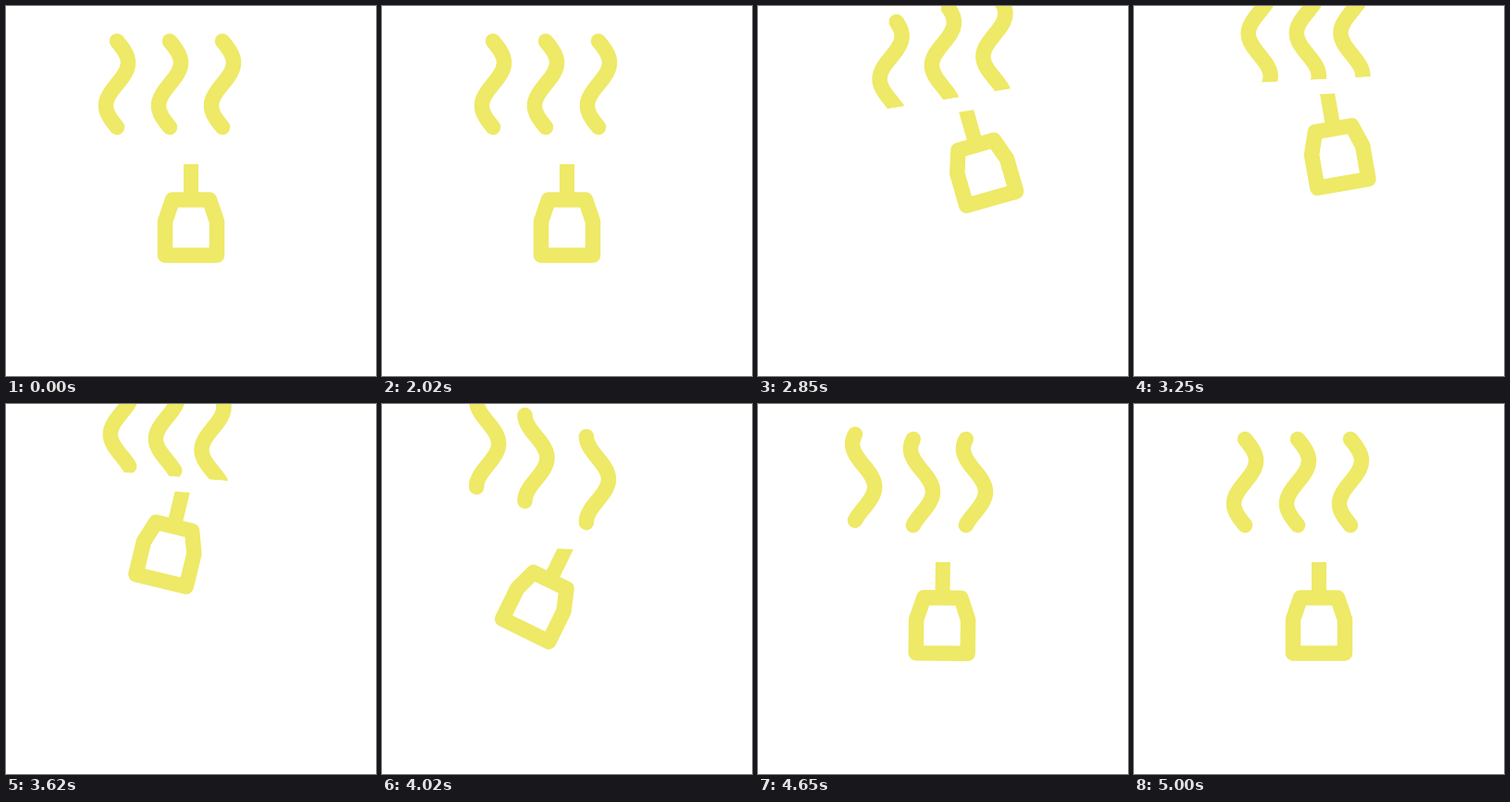
Animation of 400x400 px, one loop 5200 ms. Source, as an HTML page with a canvas:

```html
<!DOCTYPE html>
<html>
<head>
<meta charset="utf-8">
<style>
html, body { margin: 0; height: 100%; overflow: hidden; background: #fff; }
canvas { display: block; }
</style>
</head>
<body>
<canvas id="stage" width="400" height="400"></canvas>
<script>
const ctx = document.getElementById('stage').getContext('2d');
const LOOP = 5200, START = 2020, END = 5000, PERIOD = 93, YELLOW = '#eee966';

const progress = (t, from, to) => Math.min(1, Math.max(0, (t - from) / (to - from)));
const ease = (t, from, to) => {
  const u = progress(t, from, to);
  return u * u * (3 - 2 * u);
};

// Eases from 0 at START through [time, value] keys.
function through(t, ...keys) {
  let from = START, value = 0;
  for (const [to, next] of keys) {
    if (t < to) return value + (next - value) * ease(t, from, to);
    [from, value] = [to, next];
  }
  return value;
}

const cupX = t => 200 + through(t, [2850, 23], [3650, -7.5], [4020, 2], [4200, 0]);
const cupY = t => 163 - 76 * (ease(t, START, 3250) - ease(t, 3600, 4180));
const cupTilt = t => through(t, [2850, -9.3], [3750, 5.5], [4300, 0]);
const bagSwing = t => through(t, [3000, -17], [3980, 27], [4400, -9], [4720, 2], [END, 0]);

// Every plume follows the cup; a larger lag makes it trail further behind.
function drawSteam(x, lag, t) {
  const mid = x + through(t, [2680, 24.5], [3620 + lag, -10.5], [4120 + lag, 0]);
  const lift = 71 * (ease(t, 2200 + lag / 2, 3300) - ease(t, 3300, 4120 + lag));
  const top = 38 - lift;
  const bottom = 131 - lift * ease(t, 2700, 3600);
  const flow = 8 * ease(t, START, 2850) +
    (2 * PERIOD - 8) * (1 - (1 - progress(t, 3600, END)) ** 1.2);

  ctx.beginPath();
  for (let i = 0; i <= 60; i++) {
    const y = top + (bottom - top) * i / 60;
    ctx.lineTo(mid + 12 * Math.sin(2 * Math.PI * (y - top + flow) / PERIOD), y);
  }
  ctx.stroke();
}

// Runs paint in rest coordinates, turned about the point where the string hangs.
function hung(t, degrees, paint) {
  ctx.save();
  ctx.translate(cupX(t), cupY(t));
  ctx.rotate(degrees * Math.PI / 180);
  ctx.translate(-200, -163);
  paint();
  ctx.restore();
}

function whiteBlock(t, height) {
  ctx.fillStyle = '#fff';
  hung(t, cupTilt(t), () => ctx.fillRect(60, 155, 280, height));
}

const bag = new Path2D('M180 209.5H220L228 233V269.5H172V233Z');

function draw(t) {
  ctx.fillStyle = '#fff';
  ctx.fillRect(0, 0, 400, 400);
  ctx.strokeStyle = YELLOW;
  ctx.lineWidth = 16.5;
  ctx.lineCap = ctx.lineJoin = 'round';
  for (let i = 0; i < 3; i++) drawSteam(120 + 57 * i, 400 * (2 - i), t);

  whiteBlock(t, 130); // cup body hides the steam
  hung(t, bagSwing(t), () => {
    ctx.stroke(bag);
    ctx.fillStyle = YELLOW;
    ctx.fillRect(192, 163, 16, 42);
  });
  whiteBlock(t, 16); // rim hides the top of the string
}

const began = performance.now();
function frame() {
  draw((performance.now() - began) % LOOP);
  requestAnimationFrame(frame);
}
frame();
</script>
</body>
</html>
```
